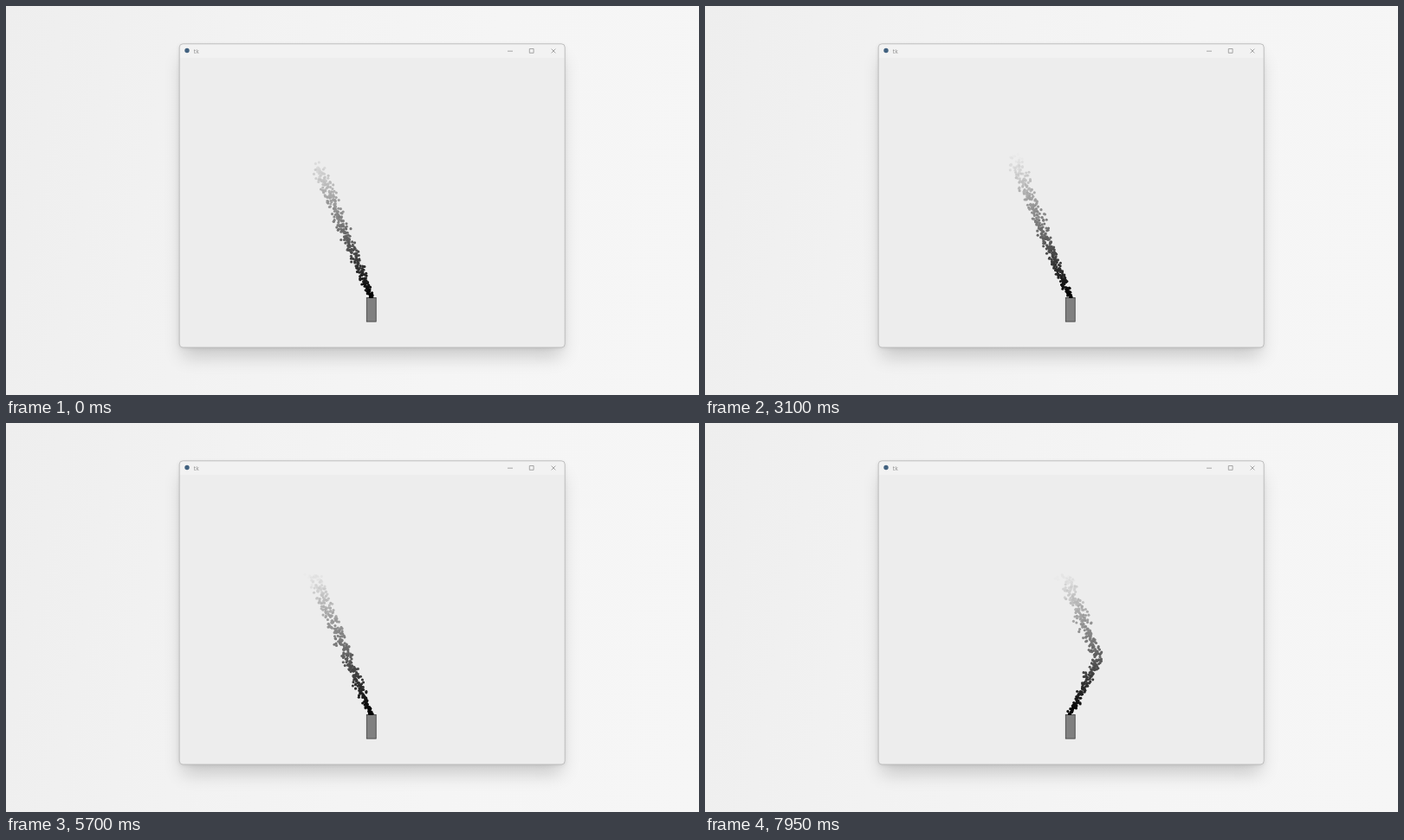
An HTML page with a canvas that plays this animation: 800x450 px, repeating every 8000 ms.

```html
<!DOCTYPE html>
<html lang="en">
<head>
<meta charset="utf-8">
<title>Smoke</title>
<style>
  html, body { margin: 0; width: 100%; height: 100%; overflow: hidden; }
  body {
    position: relative;
    background: linear-gradient(100deg, #eee 0%, #f2f2f2 30%, #f5f5f5 65%, #f6f6f6 100%);
  }
  .shadow {
    position: absolute; left: 200px; top: 44px; width: 445px; height: 351px; border-radius: 4px;
    box-shadow: 0 14px 20px -4px rgba(0, 0, 0, .19), 0 1px 5px rgba(0, 0, 0, .09);
  }
  svg, canvas { position: absolute; left: 0; top: 0; }
</style>
</head>
<body>
<div class="shadow"></div>
<svg width="800" height="450">
  <rect x="200.2" y="43.8" width="445" height="351.2" rx="4" fill="#ededed"/>
  <path d="M200.2 60V47.8a4 4 0 0 1 4-4h437a4 4 0 0 1 4 4V60z" fill="#f2f2f2"/>
  <rect x="200.2" y="43.8" width="445" height="351.2" rx="4" fill="none" stroke="#b8b8b8" stroke-width=".9"/>
  <circle cx="209" cy="51.5" r="2.7" fill="#41617f"/>
  <text x="216.8" y="54.5" font-family="'Open Sans', sans-serif" font-size="6.7" fill="#8a8a8a">tk</text>
  <path d="M579 52.2h6 M604.3 49.5h4.8v4.8h-4.8z M629.6 49.6l4.8 4.8 M634.4 49.6l-4.8 4.8"
        fill="none" stroke="#949494" stroke-width=".8"/>
  <rect x="416.3" y="337.5" width="10.9" height="27.6" fill="#808080" stroke="#3c3c3c" stroke-width=".8"/>
</svg>
<canvas width="800" height="450"></canvas>
<script>
const ctx = document.querySelector('canvas').getContext('2d');

const LOOP = 8000, STEP = 50;
const LIFE = 94, FIRST = -87, PER_STEP = 4;   // in steps, except the count
const RISE = 34.5;                            // px per second
const WIND_LEFT = -14, WIND_RIGHT = 18, WIND_TURN = 6.1;
const BACKDROP = 237;

function random(seed) {
  let h = Math.imul(seed + 1013, 0x9E3779B1);
  h = Math.imul(h ^ h >>> 15, 0x85EBCA6B);
  h = Math.imul(h ^ h >>> 13, 0xC2B2AE35);
  return ((h ^ h >>> 16) >>> 0) / 2 ** 32;
}

function gaussian(seed) {
  let sum = 0;
  for (let i = 0; i < 4; i++) sum += random(seed * 4 + i);
  return (sum - 2) * Math.sqrt(3);
}

// Total sideways drift of the air up to a given second.
function drift(s) {
  return WIND_LEFT * Math.min(s, WIND_TURN) + WIND_RIGHT * Math.max(0, s - WIND_TURN);
}

function drawParticle(id, born, now) {
  const age = now - born;
  const spread = 1.5 * Math.sqrt(age);
  const x = 421.3 + drift(now) - drift(born) + gaussian(id * 2) * (1.2 + spread);
  const y = 336.5 - RISE * age + gaussian(id * 2 + 1) * spread;
  const shade = Math.round(BACKDROP * age * 1000 / STEP / LIFE);
  ctx.fillStyle = `rgb(${shade},${shade},${shade})`;
  ctx.beginPath();
  ctx.arc(x, y, 1.55, 0, 2 * Math.PI);
  ctx.fill();
}

function draw() {
  const step = Math.floor(performance.now() % LOOP / STEP);
  ctx.clearRect(0, 0, 800, 450);
  for (let birth = Math.max(FIRST, step - LIFE); birth <= step; birth++) {
    for (let i = 0; i < PER_STEP; i++) {
      drawParticle((birth - FIRST) * PER_STEP + i, birth * STEP / 1000, step * STEP / 1000);
    }
  }
  requestAnimationFrame(draw);
}
draw();
</script>
</body>
</html>
```
